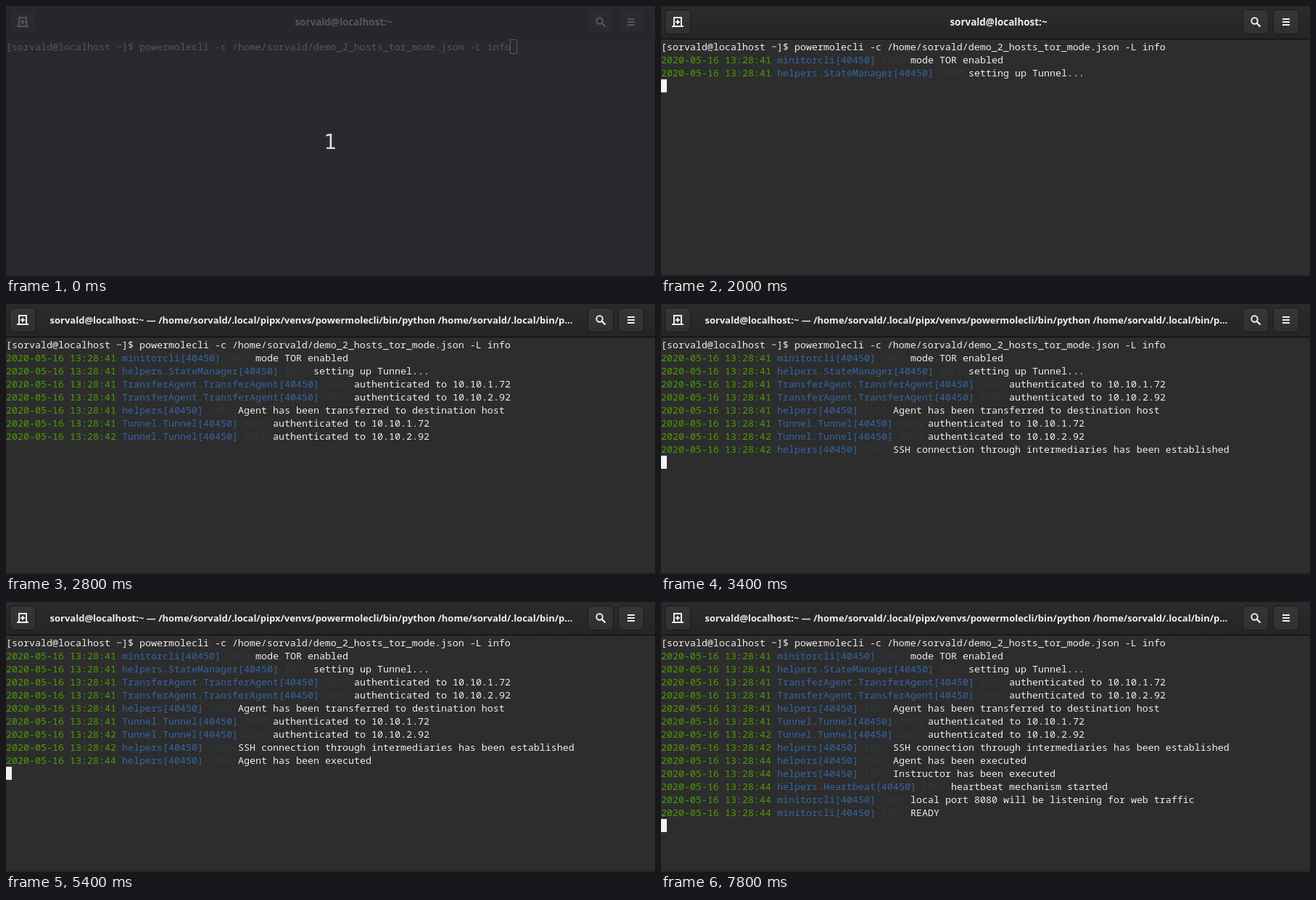
Recreate the animation shown at these times as an HTML page with a canvas. Size 895 by 372 pixels, loop 8000 ms.

```html
<!DOCTYPE html>
<html lang="en">
<head>
<meta charset="utf-8">
<title>Terminal session</title>
<style>
  html, body { margin: 0; width: 100%; height: 100%; overflow: hidden; background: #2d2d2d; }
  canvas { display: block; }
</style>
</head>
<body>
<canvas id="stage" width="895" height="372"></canvas>
<script>
const W = 895, H = 372, LOOP = 8000;
const CELL = 8, ROW = 18, TOP = 47, HEADER = 45;
const FG = '#eeeeec', GREEN = '#4e9a06', BLUE = '#3465a4', FAINT = '#31373d';
const MONO = '13.3333px "Noto Sans Mono", monospace';
const TITLE_FONT = '"Noto Sans", "Open Sans", sans-serif';

const USER = 'sorvald';
const HOST_TITLE = `${USER}@localhost:~`;
const RUN_TITLE = `${HOST_TITLE} — /home/${USER}/.local/pipx/venvs/powermolecli/bin/python /home/${USER}/.local/bin/p…`;
const COMMAND = `[${USER}@localhost ~]$ powermolecli -c /home/${USER}/demo_2_hosts_tor_mode.json -L info`;

// [time shown, clock second, logger, message]
const LOG = [
  [2000, 41, 'minitorcli', 'mode TOR enabled'],
  [2000, 41, 'helpers.StateManager', 'setting up Tunnel...'],
  [2200, 41, 'TransferAgent.TransferAgent', 'authenticated to 10.10.1.72'],
  [2400, 41, 'TransferAgent.TransferAgent', 'authenticated to 10.10.2.92'],
  [2400, 41, 'helpers', 'Agent has been transferred to destination host'],
  [2400, 41, 'Tunnel.Tunnel', 'authenticated to 10.10.1.72'],
  [2800, 42, 'Tunnel.Tunnel', 'authenticated to 10.10.2.92'],
  [3400, 42, 'helpers', 'SSH connection through intermediaries has been established'],
  [5400, 44, 'helpers', 'Agent has been executed'],
  [6000, 44, 'helpers', 'Instructor has been executed'],
  [6000, 44, 'helpers.Heartbeat', 'heartbeat mechanism started'],
  [6000, 44, 'minitorcli', 'local port 8080 will be listening for web traffic'],
  [6000, 44, 'minitorcli', 'READY']
];

// The cursor flips at each of these times, starting visible.
const BLINKS = [600, 1200, 2400, 3400, 4000, 4200, 4800, 5400, 6600, 7000, 7200, 7800];

const ctx = document.getElementById('stage').getContext('2d');

function rect(x, y, w, h, color) {
  ctx.fillStyle = color;
  ctx.fillRect(x, y, w, h);
}

function text(str, x, y, color, font, align = 'left') {
  ctx.font = font;
  ctx.textAlign = align;
  ctx.fillStyle = color;
  ctx.fillText(str, x, y);
}

function vertical(y0, y1, from, to) {
  const g = ctx.createLinearGradient(0, y0, 0, y1);
  g.addColorStop(0, from);
  g.addColorStop(1, to);
  return g;
}

function line(width, ...points) {
  ctx.strokeStyle = FG;
  ctx.lineWidth = width;
  ctx.beginPath();
  points.forEach(([x, y]) => ctx.lineTo(x, y));
  ctx.stroke();
}

function button(x) {
  ctx.beginPath();
  ctx.roundRect(x + 0.5, 5.5, 35, 33, 5);
  ctx.fillStyle = vertical(5, 39, '#363636', '#303030');
  ctx.fill();
  ctx.strokeStyle = '#1a1a1a';
  ctx.lineWidth = 1;
  ctx.stroke();
}

function drawIcons() {
  line(2, [18, 28], [18, 16], [28, 16], [28, 28]);
  line(2, [15, 28], [31, 28]);
  line(2, [20, 22], [26, 22]);
  line(2, [23, 19], [23, 25]);

  ctx.beginPath();
  ctx.arc(818.5, 20.5, 4.2, 0, Math.PI * 2);
  ctx.stroke();
  line(2.4, [821.5, 23.5], [826.5, 28.5]);

  for (const y of [17, 21, 25]) rect(857, y, 10, 2, FG);
}

function drawHeader(running, focused) {
  rect(0, 0, W, HEADER, focused ? vertical(0, HEADER, '#2b2b2b', '#252525') : '#222');
  if (!focused) rect(0, 0, W, 4, '#2d2d2d');
  rect(0, HEADER, W, 1, focused ? '#090909' : '#181818');
  [5, 802, 844].forEach(button);
  drawIcons();
  if (running) text(RUN_TITLE, 421, 27, FG, `bold 13px ${TITLE_FONT}`, 'center');
  else text(HOST_TITLE, 465.5, 27, FG, `bold 13.45px ${TITLE_FONT}`, 'center');
}

function drawLogLine([, second, logger, message], row) {
  const parts = [
    [`2020-05-16 13:28:${second}`, GREEN],
    [`${logger}[40450]`, BLUE],
    ['INFO', FAINT],
    [message, FG]
  ];
  let col = 0;
  for (const [str, color] of parts) {
    text(str, col * CELL, TOP + row * ROW + 14, color, MONO);
    col += str.length + 1;
  }
}

function drawCursor(time, rows, focused) {
  const x = rows ? 0 : COMMAND.length * CELL;
  const y = TOP + (rows ? rows + 1 : 0) * ROW;
  if (!focused) {
    ctx.strokeStyle = '#fff';
    ctx.lineWidth = 1;
    ctx.strokeRect(x - 0.5, y - 0.5, CELL + 1, ROW + 1);
  } else if (BLINKS.filter(t => t <= time).length % 2 === 0) {
    rect(x, y, CELL, ROW, '#f2f2f2');
  }
}

function drawCountdown() {
  rect(0, 0, W, H, 'rgba(39, 41, 49, 0.77)');
  text('1', W / 2, 197, '#dedede', '28px "DejaVu Sans", sans-serif', 'center');
}

function draw(time) {
  const focused = time >= 200;
  const visible = LOG.filter(entry => entry[0] <= time);

  rect(0, 0, W, H, '#2d2d2d');
  rect(0, H - 2, W, 2, '#272727');
  drawHeader(time >= 2200, focused);
  text(COMMAND, 0, TOP + 14, FG, MONO);
  visible.forEach((entry, i) => drawLogLine(entry, i + 1));
  drawCursor(time, visible.length, focused);
  if (!focused) drawCountdown();
}

const start = performance.now();
function tick() {
  draw((performance.now() - start) % LOOP);
  requestAnimationFrame(tick);
}
tick();
</script>
</body>
</html>
```
